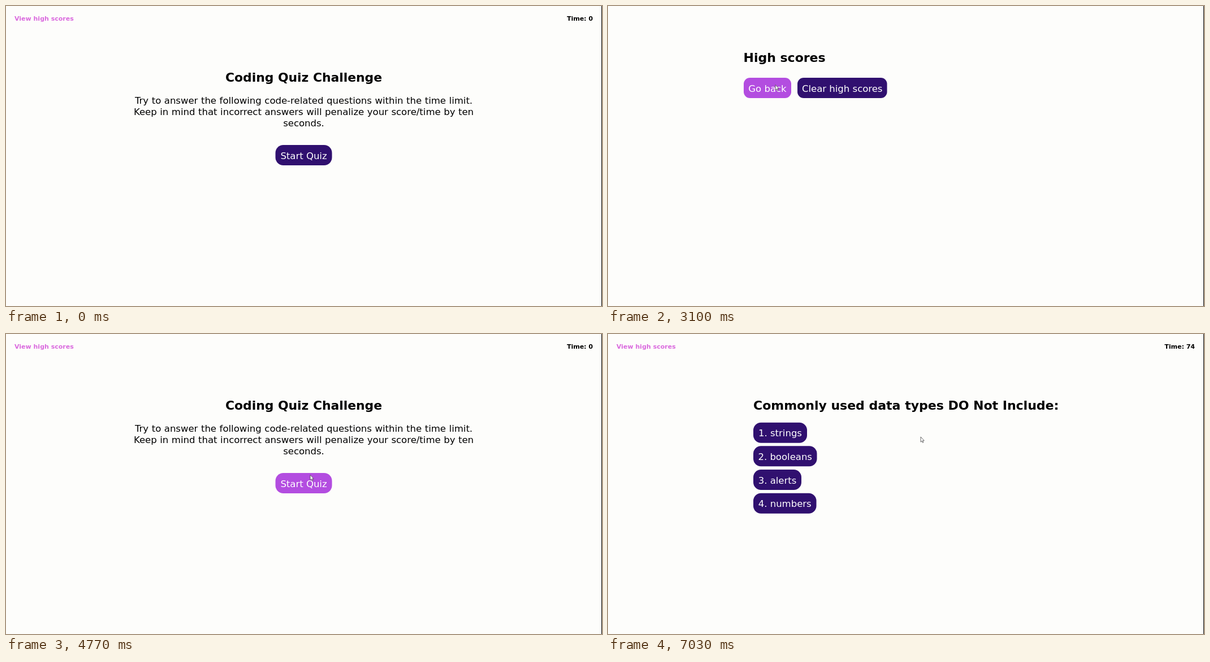
An HTML page for the animation above (8000 ms loop, 1054x531 px).

```html
<!DOCTYPE html>
<html lang="en">
<head>
<meta charset="utf-8">
<title>Coding Quiz</title>
<style>
  html, body { margin: 0; width: 100%; height: 100%; overflow: hidden; background: #fdfdfb; }
  svg { display: block; width: 1054px; height: 531px; }
  text { font: 16.5px "DejaVu Sans", sans-serif; fill: #000; white-space: pre; }
  .heading { font-size: 22px; font-weight: bold; }
  .title { font-size: 21.85px; }
  .bar { font-size: 11px; font-weight: bold; }
  .link { fill: #da69de; }
  .mid { text-anchor: middle; }
  .end { text-anchor: end; }
  .intro { word-spacing: .02em; }
  .button rect { fill: #30106f; height: 36px; }
  .button text { fill: #fff; text-anchor: middle; }

  .timed { animation: 8s step-end infinite; }
  .bars { animation-name: bars; }
  .home { animation-name: home; }
  .scores { animation-name: scores; }
  .quiz { animation-name: quiz; }
  .zero { animation-name: zero; }
  .first { animation-name: first; }
  .second { animation-name: second; }
  .pointer { animation-name: pointer; }
  .button .back { animation-name: back; }
  .button .start { animation-name: start; }

  @keyframes bars { 0%, 42.125% { visibility: visible } 23.75% { visibility: hidden } }
  @keyframes home { 0%, 42.125% { visibility: visible } 23.75%, 62.875%, 100% { visibility: hidden } }
  @keyframes scores { 0%, 42.125%, 100% { visibility: hidden } 23.75% { visibility: visible } }
  @keyframes quiz { 0% { visibility: hidden } 62.875%, 100% { visibility: visible } }
  @keyframes zero { 0%, 42.125% { visibility: visible } 23.75%, 75.375%, 100% { visibility: hidden } }
  @keyframes first { 0%, 87.875%, 100% { visibility: hidden } 75.375% { visibility: visible } }
  @keyframes second { 0% { visibility: hidden } 87.875%, 100% { visibility: visible } }
  @keyframes back { 0%, 42.125%, 100% { fill: #30106f } 38.75% { fill: #b34de0 } }
  @keyframes start { 0%, 62.875%, 100% { fill: #30106f } 59.625% { fill: #b34de0 } }
  @keyframes pointer {
    0% { visibility: hidden; transform: translate(96px, 27.5px) }
    23.75% { visibility: visible; transform: translate(96px, 27.5px) }
    35.375% { visibility: visible; transform: translate(300px, 167px) }
    38.75% { visibility: visible; transform: translate(296px, 139.5px) }
    48.75% { visibility: visible; transform: translate(448px, 224px) }
    59.625% { visibility: visible; transform: translate(538px, 249.5px) }
    62.875% { visibility: visible; transform: translate(540px, 252.5px) }
    70% { visibility: visible; transform: translate(545px, 228px) }
    75.375% { visibility: visible; transform: translate(551px, 192px) }
    87.875%, 100% { visibility: visible; transform: translate(553px, 182px) }
  }
</style>
</head>
<body>
<svg viewBox="0 0 1054 531">
  <rect width="1054" height="531" fill="#fdfdfb"/>

  <text class="timed bars bar link" x="15" y="26">View high scores</text>
  <text class="timed zero bar end" x="1038" y="26">Time: 0</text>
  <text class="timed first bar end" x="1038" y="26">Time: 75</text>
  <text class="timed second bar end" x="1038" y="26">Time: 74</text>

  <g class="timed home">
    <text class="heading title mid" x="526.5" y="134">Coding Quiz Challenge</text>
    <g class="intro mid">
      <text x="526.5" y="173">Try to answer the following code-related questions within the time limit.</text>
      <text x="526.5" y="193">Keep in mind that incorrect answers will penalize your score/time by ten</text>
      <text x="526.5" y="212.5">seconds.</text>
    </g>
    <g class="button">
      <rect class="timed start" x="476.5" y="246" width="100" rx="14"/>
      <text x="526.5" y="270.5">Start Quiz</text>
    </g>
  </g>

  <g class="timed scores">
    <text class="heading" x="239.5" y="99">High scores</text>
    <g class="button">
      <rect class="timed back" x="240" y="127" width="84" rx="11"/>
      <text x="282" y="151.5">Go back</text>
    </g>
    <g class="button">
      <rect x="335" y="127" width="158.5" rx="11"/>
      <text x="414.2" y="151.5">Clear high scores</text>
    </g>
  </g>

  <g class="timed quiz">
    <text class="heading" x="257" y="134">Commonly used data types DO Not Include:</text>
    <g class="button">
      <rect x="257" y="156.7" width="95" rx="13.5"/>
      <text x="304.5" y="181.2">1. strings</text>
    </g>
    <g class="button">
      <rect x="257" y="198.3" width="112.5" rx="13.5"/>
      <text x="313.2" y="222.8">2. booleans</text>
    </g>
    <g class="button">
      <rect x="257" y="240" width="85" rx="13.5"/>
      <text x="299.5" y="264.5">3. alerts</text>
    </g>
    <g class="button">
      <rect x="257" y="281.7" width="111.5" rx="13.5"/>
      <text x="312.7" y="306.2">4. numbers</text>
    </g>
  </g>

  <path class="timed pointer" d="M0 0V9.2L2.1 7.3 3.5 10.4 4.8 9.8 3.5 6.8H6.2Z" fill="#fff" stroke="#444" stroke-width=".8"/>
  <rect x="1053" width="1" height="531"/>
</svg>
</body>
</html>
```
